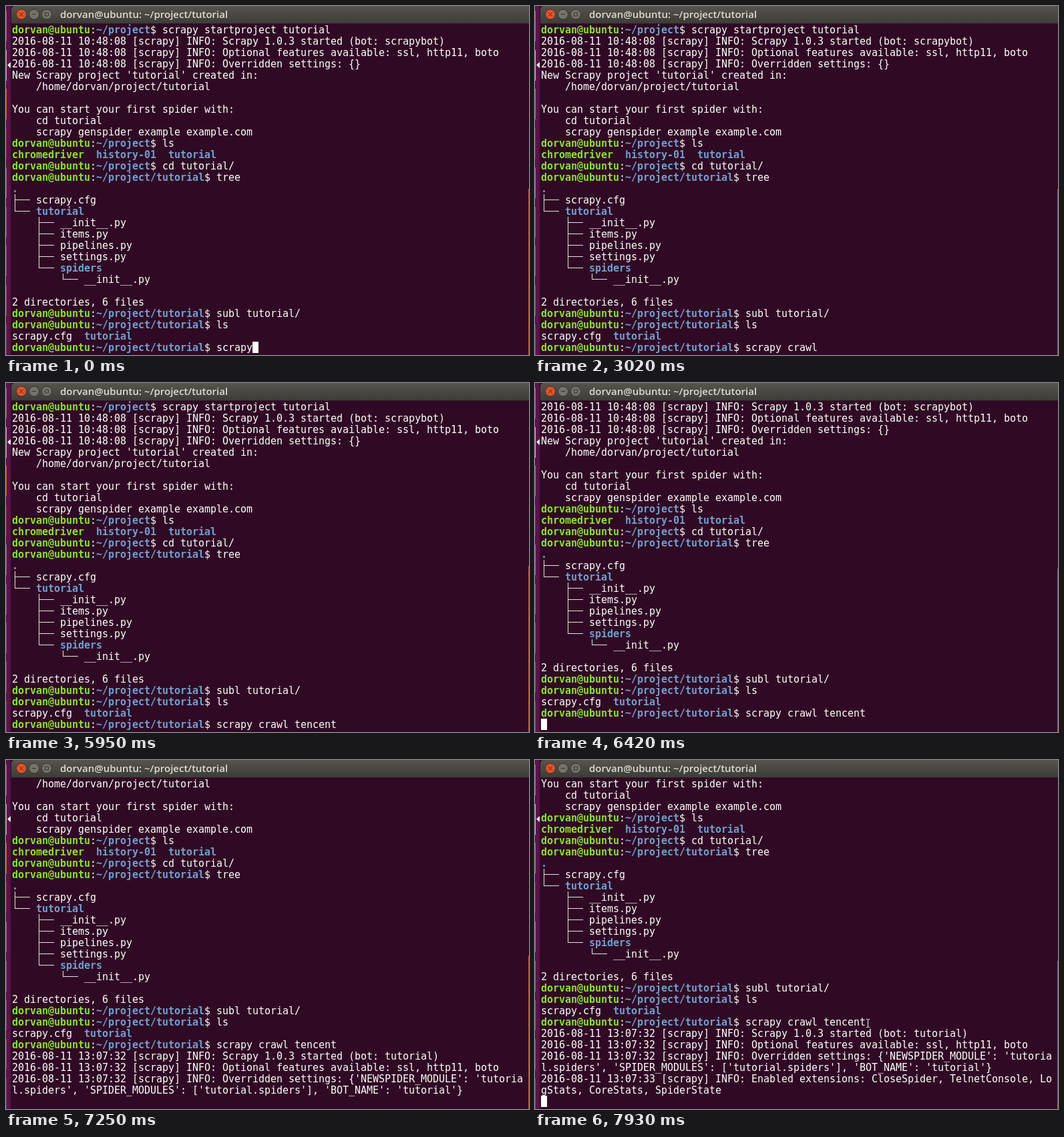
An HTML page that plays this animation: 783x523 px, repeating every 8 s.

```html
<!DOCTYPE html>
<html lang="en">
<head>
<meta charset="utf-8">
<title>Terminal session</title>
<style>
  html, body { margin: 0; width: 783px; height: 523px; overflow: hidden; }
  #stage { position: relative; width: 783px; height: 523px; overflow: hidden; background: #300a24; }
  #stage div, #stage svg { position: absolute; }
  #side { left: 0; top: 0; width: 8px; height: 523px; background: linear-gradient(90deg, #5d124c 0 6px, #45103a 7px, #2b0a22 8px); }
  .edge { left: 0; width: 1px; height: 46px; }
  #bar { left: 8px; top: 0; width: 775px; height: 26px; border-radius: 5px 0 0 0; background: linear-gradient(#56544d, #3d3c38); box-shadow: 0 1px #2a1a24; }
  #bar svg { left: 0; top: 0; }
  #name { left: 73px; top: 0; font: 600 15px/25px "Open Sans", "Noto Sans", sans-serif; color: #dfdbd2; white-space: pre; }
  #view { left: 9px; top: 27px; width: 774px; height: 496px; overflow: hidden; }
  .line { left: 0; height: 18px; font: 15px/18px "DejaVu Sans Mono", monospace; letter-spacing: -0.031px; color: #fff; white-space: pre; }
  .line b { color: #8ae234; }
  .line i { color: #729fcf; font-weight: bold; font-style: normal; }
  .rule { background: #e6e2e5; }
  #cursor { top: 476px; width: 9px; height: 17px; background: #fff; }
  #thumb { left: 782px; width: 1px; height: 523px; background: #c2592f; }
  #beam { left: 494px; top: 386px; }
</style>
</head>
<body>
<div id="stage">
  <div id="side"></div>
  <svg width="8" height="12" style="left:0;top:82px"><path d="M7 2V11L2 6.5Z" fill="#ececec"/></svg>
  <div id="bar">
    <svg width="70" height="26" fill="none" stroke="#35342f">
      <circle cx="15" cy="12.5" r="7.5" fill="#e4532a" stroke="#5a2a18"/>
      <circle cx="34" cy="12.5" r="7.5" fill="#74736a"/>
      <circle cx="53" cy="12.5" r="7.5" fill="#74736a"/>
      <path d="M12 9.5l6 6m0-6l-6 6M31 12.5h6M50.5 10h5v5h-5z"/>
    </svg>
    <div id="name">dorvan@ubuntu: ~/project/tutorial</div>
  </div>
  <div id="view"><div id="cursor"></div></div>
  <div id="thumb"></div>
  <svg id="beam" width="9" height="17" fill="none" stroke="#fff"><path d="M2 2.5h2M5 2.5h2M4.5 3v11M2 14.5h2M5 14.5h2"/></svg>
</div>
<script>
const LOOP = 8000, CELL = 9, ROW = 17, PROMPT_ROW = 28, PROMPT_COLS = 34;
const byId = id => document.getElementById(id);
const view = byId('view'), cursor = byId('cursor'), thumb = byId('thumb'), beam = byId('beam');

const dir = t => `<i>${t}</i>`;
const prompt = (path, cmd) => `<b>dorvan@ubuntu</b>:${dir(path)}$ ${cmd}`;
const root = '~/project', sub = '~/project/tutorial';
const log = (time, msg) => `2016-08-11 ${time} [scrapy] INFO: ${msg}`;
// Tree entry: text plus the column of its branch; `last` ends the branch.
const node = (col, text, last) => ({ text: ' '.repeat(col + 4) + text, col, last });

const lines = [
  prompt(root, 'scrapy startproject tutorial'),
  log('10:48:08', 'Scrapy 1.0.3 started (bot: scrapybot)'),
  log('10:48:08', 'Optional features available: ssl, http11, boto'),
  log('10:48:08', 'Overridden settings: {}'),
  "New Scrapy project 'tutorial' created in:",
  '    /home/dorvan/project/tutorial',
  '',
  'You can start your first spider with:',
  '    cd tutorial',
  '    scrapy genspider example example.com',
  prompt(root, 'ls'),
  `<b>chromedriver</b>  ${dir('history-01')}  ${dir('tutorial')}`,
  prompt(root, 'cd tutorial/'),
  prompt(sub, 'tree'),
  dir('.'),
  node(0, 'scrapy.cfg'),
  node(0, dir('tutorial'), true),
  node(4, '__init__.py'),
  node(4, 'items.py'),
  node(4, 'pipelines.py'),
  node(4, 'settings.py'),
  node(4, dir('spiders'), true),
  node(8, '__init__.py', true),
  '',
  '2 directories, 6 files',
  prompt(sub, 'subl tutorial/'),
  prompt(sub, 'ls'),
  `scrapy.cfg  ${dir('tutorial')}`,
  prompt(sub, '<span id="typed"></span>'),
  log('13:07:32', 'Scrapy 1.0.3 started (bot: tutorial)'),
  log('13:07:32', 'Optional features available: ssl, http11, boto'),
  log('13:07:32', "Overridden settings: {'NEWSPIDER_MODULE': 'tutoria"),
  "l.spiders', 'SPIDER_MODULES': ['tutorial.spiders'], 'BOT_NAME': 'tutorial'}",
  log('13:07:33', 'Enabled extensions: CloseSpider, TelnetConsole, Lo'),
  'gStats, CoreStats, SpiderState'
];

function rule(parent, x, y, w, h) {
  const el = document.createElement('div');
  el.className = 'rule';
  el.style.cssText = `left:${x}px;top:${y}px;width:${w}px;height:${h}px`;
  parent.append(el);
}

const rows = lines.map(line => {
  const el = document.createElement('div');
  el.className = 'line';
  el.innerHTML = line.text ?? line;
  if (line.text) {
    const x = line.col * CELL + 4;
    rule(el, x, 0, 1, line.last ? 9 : ROW);
    rule(el, x, 8, 23, 1);
  }
  view.insertBefore(el, cursor);
  return el;
});
const typed = byId('typed');

// Launcher icons peeking in at the left border
['#a86a9c', '#c9bcc8', '#c9703a', '#8c3a2c', '#8d7a94', '#94609a', '#8a5a90', '#a04c84', '#7d4a78'].forEach((color, i) => {
  const el = document.createElement('div');
  el.className = 'edge';
  el.style.top = 7 + i * 58.7 + 'px';
  el.style.background = color;
  byId('side').append(el);
});

// [start ms, typed characters, cursor on, scrolled lines, pointer visible]
const command = 'scrapy crawl tencent';
const steps = [
  [0, 6, 1, 0, 0],
  [280, 7, 1, 0, 0],
  [840, 7, 0, 0, 0],
  [1400, 8, 1, 0, 0],
  [1670, 10, 1, 0, 0],
  [1950, 11, 1, 0, 0],
  [2200, 12, 1, 0, 0],
  [2480, 13, 1, 0, 0],
  [3020, 13, 0, 0, 0],
  [3760, 13, 1, 0, 0],
  [4630, 20, 1, 0, 0],
  [4750, 20, 0, 0, 0],
  [5310, 20, 1, 0, 0],
  [5950, 20, 0, 0, 0],
  [6420, 20, 1, 1, 0],
  [7000, 20, 0, 1, 0],
  [7250, 20, 0, 5, 0],
  [7680, 20, 1, 5, 1],
  [7930, 20, 1, 7, 1]
];

function show([, chars, lit, scroll, pointer]) {
  const end = scroll ? scroll + PROMPT_ROW : PROMPT_ROW + 1;
  rows.forEach((el, i) => {
    el.style.top = (i - scroll) * ROW + 'px';
    el.style.display = i >= scroll && i < end ? '' : 'none';
  });
  typed.textContent = command.slice(0, chars);
  cursor.style.left = (scroll ? 0 : (PROMPT_COLS + chars) * CELL) + 'px';
  cursor.style.visibility = lit ? 'visible' : 'hidden';
  beam.style.visibility = pointer ? 'visible' : 'hidden';
  thumb.style.top = Math.round(274 + scroll * 3.8) + 'px';
}

const start = performance.now();
let current;
function tick() {
  const t = (performance.now() - start) % LOOP;
  const step = steps.findLast(s => s[0] <= t);
  if (step !== current) show(current = step);
  requestAnimationFrame(tick);
}
tick();
</script>
</body>
</html>
```
